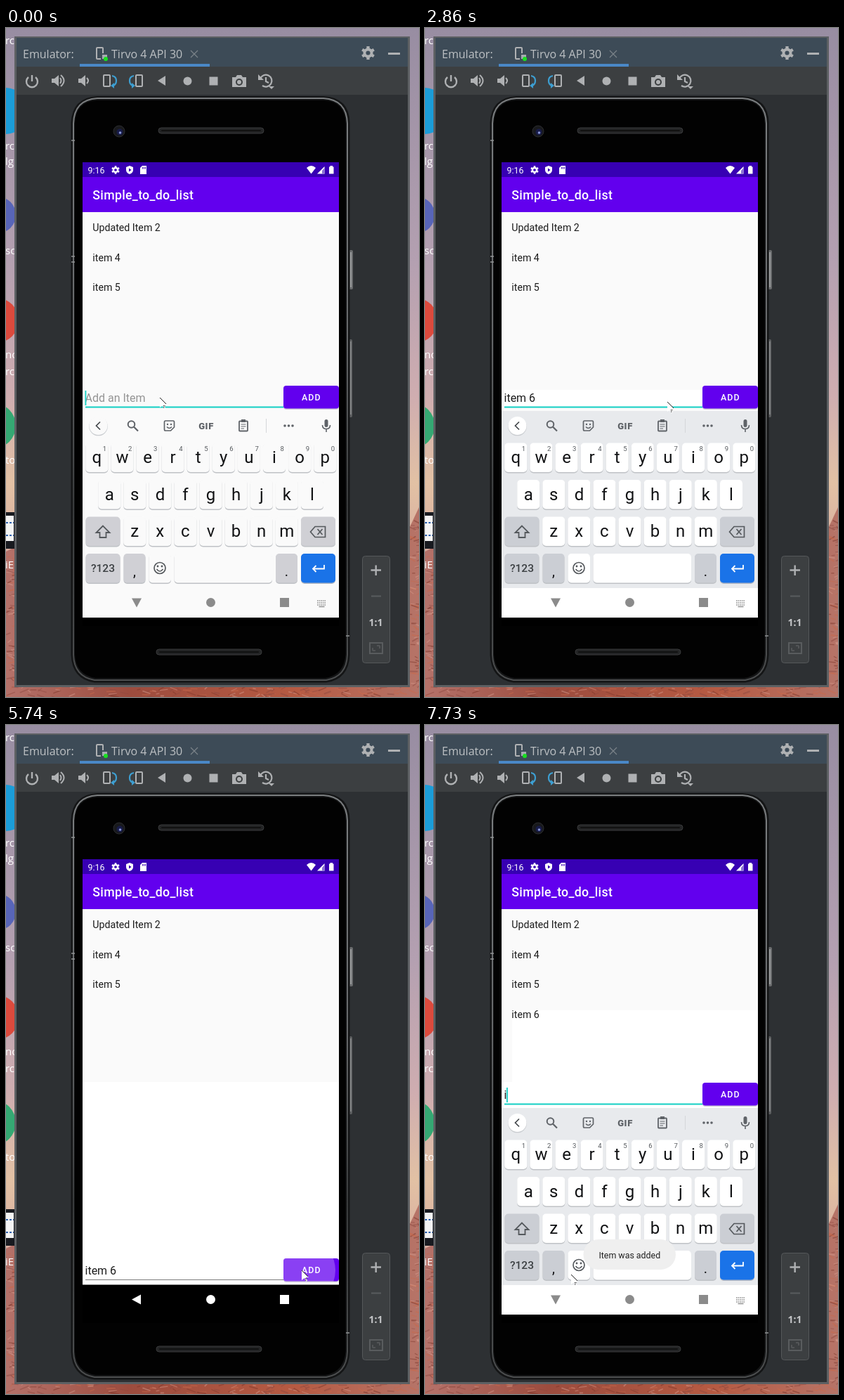
Recreate the animation shown at these times as an HTML page. Size 588 px wide and 952 px high, loop 8000 ms.

```html
<!DOCTYPE html>
<html lang="en">
<head>
<meta charset="utf-8">
<title>To-do list in an emulator</title>
<style>
  html, body { margin: 0; width: 100%; height: 100%; overflow: hidden; background: #2d3033; }
  svg { display: block; width: 588px; height: 952px; }
  text { font-family: Roboto, sans-serif; white-space: pre; }
  .ui { font-family: "Open Sans", "Noto Sans", sans-serif; }
</style>
</head>
<body>
<svg viewBox="0 0 588 952" xmlns="http://www.w3.org/2000/svg">
  <defs>
    <linearGradient id="sky" x2="0" y2="1">
      <stop offset="0" stop-color="#988da2"/>
      <stop offset=".35" stop-color="#b4a0b1"/>
      <stop offset=".55" stop-color="#cfadb0"/>
      <stop offset=".68" stop-color="#e2c1a4"/>
      <stop offset=".78" stop-color="#d9aea0"/>
    </linearGradient>
    <linearGradient id="rock" x2="1">
      <stop offset="0" stop-color="#b5726a"/>
      <stop offset=".3" stop-color="#9c4c3e"/>
      <stop offset=".7" stop-color="#b65a42"/>
      <stop offset="1" stop-color="#b67468"/>
    </linearGradient>
    <linearGradient id="rim" x2="0" y2="1">
      <stop offset="0" stop-color="#7b7e80"/>
      <stop offset=".4" stop-color="#66686a"/>
      <stop offset=".7" stop-color="#393b3c"/>
      <stop offset="1" stop-color="#4c4e4f"/>
    </linearGradient>
    <clipPath id="screen"><path d="M109 191H474V839H109Z"/></clipPath>
    <clipPath id="button"><rect x="395" y="509" width="79" height="33" rx="4"/></clipPath>
  </defs>
  <g id="desktop"></g>
  <g id="frame"></g>
  <g id="phone"></g>
  <g id="live"></g>
</svg>
<script>
const $ = id => document.getElementById(id);
const rect = (x, y, w, h, fill, rx = 0, more = '') =>
  `<rect x="${x}" y="${y}" width="${w}" height="${h}" rx="${rx}" fill="${fill}" ${more}/>`;
const circle = (x, y, r, fill, more = '') => `<circle cx="${x}" cy="${y}" r="${r}" fill="${fill}" ${more}/>`;
const shape = (d, fill, more = '') => `<path d="${d}" fill="${fill}" ${more}/>`;
const line = (d, color, width = 1, more = '') =>
  `<path d="${d}" fill="none" stroke="${color}" stroke-width="${width}" ${more}/>`;
const text = (s, x, y, size, fill, more = '') =>
  `<text x="${x}" y="${y}" font-size="${size}" fill="${fill}" ${more}>${s}</text>`;
const group = (body, x = 0, y = 0, more = '') => `<g transform="translate(${x} ${y})" ${more}>${body}</g>`;
const mid = 'text-anchor="middle"';
const gear = (r, fill, hole) => line(`M0 ${-r}V${r}M${-r * .87} ${-r / 2}L${r * .87} ${r / 2}M${-r * .87} ${r / 2}L${r * .87} ${-r / 2}`,
  fill, r * .45) + circle(0, 0, r * .74, fill) + circle(0, 0, r * .32, hole);

function rockGrain() {
  let seed = 7;
  const random = () => (seed = seed * 16807 % 2147483647) / 2147483647;
  const tones = ['#d59a8c', '#7c3529', '#c9694c', '#8d4a42'];
  const streak = (x, y) => line(`M${x} ${y}l${4 + random() * 9} ${-5 + random() * 10}`, tones[random() * 4 | 0], 1 + random(), 'opacity=".5"');
  let d = '';
  for (let i = 0; i < 130; i++) d += streak(random() * 588, 938 + random() * 14);
  for (let i = 0; i < 70; i++) d += streak(574 + random() * 12, 700 + random() * 240);
  for (let i = 0; i < 50; i++) d += streak(random() * 10, 750 + random() * 190);
  return d;
}

function desktop() {
  const labels = [['rc', 23], ['rc', 173], ['lg', 195], ['sc', 322], ['no', 470], ['rc', 494], ['to', 620], ['iE', 769]];
  return rect(0, 0, 588, 952, 'url(#sky)')
    + shape('M0 745L14 738V952H0ZM0 936H588V952H0ZM574 712L588 682V952H574Z', 'url(#rock)') + rockGrain()
    + circle(-1, 118, 33, '#1b9cd8') + circle(-12, 266, 26, '#5865b8')
    + circle(-14, 416, 32, '#dc4a3d') + circle(-18, 566, 32, '#35a873')
    + rect(0, 689, 13, 52, '#181a20') + rect(0, 694, 11, 36, '#f4f4f4')
    + line('M0 704H11M0 722H11', '#3264b0', 2, 'stroke-dasharray="3 2"')
    + labels.map(([s, y]) => text(s, -1, y, 15, '#fff', 'class="ui"')).join('');
}

function toolbar() {
  const c = '#afb1b3', blue = '#3d9fd2';
  const speaker = 'M-9 -3H-5L1 -8V8L-5 3H-9Z';
  const turn = rect(-9, -8, 9, 16, 'none', 1, `stroke="${c}" stroke-width="2"`)
    + line('M3 -7Q9 -6 9 0Q9 6 4 7', blue, 2.2) + shape('M1 7L6 3V11Z', blue);
  return group(line('M-5 -6A8 8 0 1 0 5 -6M0 -9V0', c, 2.4), 37, 76)
    + group(shape(speaker, c) + line('M3 -4Q6 0 3 4M4 -8Q13 0 4 8', c, 2), 74, 75)
    + group(shape(speaker, c) + line('M3 -4Q7 0 3 4', c, 2), 112, 75)
    + group(turn, 148, 75)
    + `<g transform="translate(185 75) scale(-1 1)">${turn}</g>`
    + shape('M216 75L227 68V82Z', c) + circle(258.5, 75.5, 6, c) + rect(289.5, 69.5, 12, 12, c)
    + group(shape('M-10 -6H-5L-3 -9H3L5 -6H10V8H-10Z', c) + circle(0, 1, 5, '#3c3f41') + circle(0, 1, 3, c), 332, 76)
    + group(line('M-8 -3A8.5 8.5 0 1 1 -5 7M0 -5V1L4 3', c, 2.2) + shape('M-11 -9V-1H-3Z', c) + shape('M4 8H12L8 12Z', c), 370, 75);
}

function frame() {
  const c = '#afb1b3', dim = '#595c5e';
  return rect(12, 12, 563, 926, '#5d6063') + rect(15, 14, 557, 921, '#2d3033')
    + rect(15, 14, 557, 41, '#3d4b57') + rect(15, 55, 557, 40, '#3c3f41')
    + rect(105, 51, 185, 4, '#4a88c7')
    + text('Emulator:', 24, 42.5, 16, '#bdc1c4', 'class="ui"')
    + text('Tirvo 4 API 30', 150, 42.5, 16, '#bdc1c4', 'class="ui"')
    + rect(129, 28, 9, 16, 'none', 1, `stroke="${c}" stroke-width="2"`)
    + rect(135, 36, 9, 9, '#3d4b57') + rect(137, 38, 7, 6, '#a5abb0') + circle(142, 44, 3, '#18e020')
    + line('M263 32L273 42M273 32L263 42', '#7b8389', 1.2)
    + group(gear(9.5, c, '#3d4b57'), 515.5, 35.5) + rect(544, 35, 17, 3, c)
    + toolbar()
    + rect(507.5, 751.5, 39, 152, '#3c3f41', 4, 'stroke="#55585a"')
    + line('M519.500 771.500H534M526.700 764.500V779', c, 2.4) + line('M520 808.500H534', dim, 2)
    + text('1:1', 526.5, 851, 14, '#c5c7c9', `class="ui" font-weight="700" ${mid}`)
    + rect(518, 875, 18, 15, 'none', 0, `stroke="${dim}" stroke-width="2"`)
    + line('M522 886V882M522 886H526M532 879H528M532 879V883', dim, 1.5);
}

function phone() {
  const slot = y => rect(217, y, 150, 8, '#232425', 4, 'stroke="#3a3b3c"') + rect(221, y + 3, 142, 2, '#111', 1);
  return rect(488, 316, 6, 56, '#696b6d', 2) + rect(488, 443, 5, 111, '#5c5e60', 2)
    + rect(490, 319, 2, 50, '#999b9c') + rect(490, 446, 1.5, 104, '#8b8d8e')
    + shape('M130 97H452Q489 99 489.500 135V892Q488 927 456 931.500H126Q94 927 92.500 892V135Q94 99 130 97Z', '#141516')
    + line('M96 892V136Q97 102 130 100H452Q485 102 486 136V892Q485 923 456 928H126Q97 923 96 892Z', 'url(#rim)', 2)
    + shape('M130 103H452Q483 104 483.500 137V890Q482 921 454 925H128Q99 921 98 890V137Q99 104 130 103Z', '#020202')
    + line('M93 160H98M93 325H98M93 333H98M484 865H489', '#909294', 1.4)
    + slot(142) + group(slot(0), -3, 884)
    + circle(161, 147, 8, '#18191c', 'stroke="#2c2d30"') + circle(162, 148, 4.5, '#171b47') + circle(162.5, 149, 1.8, '#8795d8');
}

function appBars() {
  const w = '#fff';
  return rect(109, 191, 365, 21, '#3700b3') + rect(109, 212, 365, 50, '#6200ee')
    + text('9:16', 116.5, 206.5, 12.4, w)
    + group(gear(5.8, w, '#3700b3'), 156, 202)
    + shape('M176 196L181 198V202Q181 206 176 208Q171 206 171 202V198Z', w) + shape('M175 199.5L178.5 202L175 204.5Z', '#3700b3')
    + shape('M194 196H200V208H191V199Z', w) + line('M194.5 198V200.5M196.5 198V200.5M198.5 198V200.5', '#3700b3', 1)
    + shape('M428 199Q434.500 193 441 199L434.500 207.500Z', w)
    + shape('M443 207.500L453.500 197V207.500Z', w) + shape('M450 203L453.500 199V207.500H450Z', '#8d74d5')
    + shape('M461.500 196H465V197.500H466.500V207.500H460V197.500H461.500Z', w)
    + text('Simple_to_do_list', 123.3, 244, 17.74, w, 'font-weight="500" letter-spacing=".3"');
}

function keyStrip({ strip, chip }) {
  const g = '#5f6368', chevron = strip === 'tools' ? 'M134 560.500L128.500 566L134 571.500' : 'M128.500 560.500L134 566L128.500 571.500';
  const mic = rect(453.5, 557, 5, 11, g, 2.5) + line('M450.500 565Q450.500 570.500 456 570.500Q461.500 570.500 461.500 565M456 570.500V575', g, 1.6);
  const tools = circle(178.5, 564, 4.8, 'none', `stroke="${g}" stroke-width="2"`) + line('M182 567.500L188 573.500', g, 2.2)
    + line('M227 559H238Q239.500 559 239.500 561V568L234.500 573H227Q225.500 573 225.500 571V561Q225.500 559 227 559Z', g, 1.7)
    + circle(230, 564, 1.2, g) + circle(235, 564, 1.2, g) + line('M229 567.500Q232.500 571.500 236 567.500', g, 1.5)
    + text('GIF', 285, 570.5, 13, g, `font-weight="900" letter-spacing=".6" ${mid}`)
    + rect(332, 559.5, 12, 14, 'none', 1, `stroke="${g}" stroke-width="1.8"`) + rect(335, 557, 6, 4, g)
    + line('M334.500 564H341.500M334.500 567H341.500M334.500 570H339', g, 1.2)
    + line('M370.500 556V576', '#d5d7da') + [397, 402.5, 408].map(x => circle(x, 566, 1.8, g)).join('');
  const words = [['item', 189.5], ['Item', 290.5], ['items', 391]].map(([s, x]) => text(s, x, 572, 16, '#53575b', mid)).join('')
    + line('M237.500 556V576M344.500 556V576', '#cfd2d6');
  return circle(131.5, 567, 13.3, '#c9ccd0') + circle(131.5, 566, 13, chip)
    + line(chevron, '#44484c', 1.7) + mic + ({ tools, words }[strip] || '');
}

function keyboard(s) {
  const ink = '#111214', g = '#55595d', step = 36.1;
  const key = (x, y, w, fill) => rect(x, y + 1, w, 42, '#bfc2c6', 5) + rect(x, y, w, 41.5, fill, 5);
  const letters = (row, x, y) => [...row].map((c, i) =>
    key(x + i * step - 16, y, 32, s.chip) + text(c, x + i * step, y + 28.5, 24, ink, mid)).join('');
  const digits = [...'1234567890'].map((d, i) => text(d, 140.5 + i * step, 601.5, 9.5, g, mid)).join('');
  return rect(109, 545, 365, 252, s.tone) + rect(109, 797, 365, 42, s.chip)
    + keyStrip(s)
    + letters('qwertyuiop', 129.3, 590.5) + digits + letters('asdfghjkl', 147.2, 643) + letters('zxcvbnm', 183.2, 695.5)
    + key(113.5, 695.5, 49, s.dark) + line('M138 708.500L128.500 718H133.500V725H142.500V718H147.500Z', g, 1.8)
    + key(420, 695.5, 49, s.dark) + line('M433.500 717L440 709.500H454.500V724.500H440ZM443.500 713L450.500 721M450.500 713L443.500 721', g, 1.7)
    + key(113.5, 748, 49, s.dark) + text('?123', 138, 774, 15.5, '#3c4043', `font-weight="500" ${mid}`)
    + key(167.5, 748, 31, s.dark) + text(',', 183, 780, 20, ink, mid)
    + key(203.5, 748, 31.5, s.chip) + circle(219, 768.5, 8, 'none', `stroke="${g}" stroke-width="1.7"`)
    + circle(216, 766, 1.4, g) + circle(222, 766, 1.4, g) + line('M214.500 770Q219 776 223.500 770', g, 1.6)
    + key(239.5, 748, 139.5, s.chip)
    + key(384, 748, 31, s.dark) + text('.', 399.5, 780, 20, ink, mid)
    + rect(420, 749, 49, 42, '#b3b9c4', 5) + rect(420, 748, 49, 41.5, '#1a73e8', 5)
    + line('M453 764V769.500H437.500M441.500 765L437 769.500L441.500 774', '#fff', 1.8);
}

function navIcons({ nav, spin, imeIcon }) {
  const dots = [0, 3, 6].map(y => line(`M443 ${815 + y}H456`, '#8d8d8d', 1.6, 'stroke-dasharray="1.6 1"')).join('');
  return `<g transform="translate(186 817.5) rotate(${spin})">${shape('M-7 -6H7L0 7Z', nav)}</g>`
    + circle(291.5, 817.5, 6.5, nav) + rect(390, 811, 13, 13, nav)
    + (imeIcon ? dots + line('M445.500 823.500H453.500', '#8d8d8d', 1.4) : '');
}

function inputRow(s) {
  const button = rect(395, 510, 79, 33, '#cfcbd8', 4) + rect(395, 509, 79, 32.5, '#6200ee', 4)
    + (s.ripple ? `<g clip-path="url(#button)">${circle(421, 526, s.ripple, '#fff', 'opacity=".25"')}</g>` : '')
    + text('ADD', 421, 530, 12.4, '#fff', 'font-weight="500" letter-spacing="1.1"');
  return group(
    (s.value ? text(s.value, 112.5, 532, 16, '#1c1c1c') : text('Add an Item', 112.5, 532, 16, '#949494'))
    + (s.compose ? line(`M113 534.500H${s.compose}`, '#222', 1.1) : '')
    + (s.focus ? rect(113, 538.5, 283, 2, '#12cfc4') : rect(113, 539, 283, 1, '#7a7a7a'))
    + (s.caret ? rect(s.caret, 516, 1.8, 21, '#12cfc4') : '') + button, 0, s.drop);
}

const pointer = (x, y) => group(shape('M0 0L10 10H6L8 15L6 16L4 11L0 14Z', '#fff')
  + line('M0 0L9 9M5 11L6 12.500M7.500 12L6.500 11M5 14H6.500', '#222', 1), x, y);

const toast = () => rect(225.5, 732, 131.5, 43, '#efefef', 21.5)
  + text('Item was added', 291.3, 758.5, 12.4, '#222', mid);

function scene(s) {
  const items = ['Updated Item 2', 'item 4', 'item 5', ...(s.added ? ['item 6'] : [])];
  return rect(109, 262, 365, 535, '#fafafa') + rect(109, 508, 365, 288.5, s.backdrop)
    + (s.added ? rect(124, 406, 350, 102, '#fff') : '')
    + rect(113, 515, 283, 25, s.chip)
    + appBars()
    + items.map((item, i) => text(item, 123.3, 289 + i * 42.5, 14.2, '#1b1b1b')).join('')
    + inputRow(s) + rect(109, 796.5, 365, 54.5, '#000')
    + (s.kb ? `<g clip-path="url(#screen)" opacity="${s.kb}">${group(keyboard(s), 0, s.shift)}</g>` : '')
    + navIcons(s)
    + (s.toast ? toast() : '')
    + pointer(...s.at);
}

const grey = { tone: '#e8eaed', chip: '#fff', dark: '#cbced4' };
const open = { ...grey, kb: 1, shift: 0, spin: 0, nav: '#8b8b8b', imeIcon: true, strip: 'tools' };
const closed = { kb: 0, spin: 90, nav: '#fff', imeIcon: false };

// Each step changes part of the state at its time in ms.
const steps = [
  [0, { ...open, tone: '#fafafa', chip: '#fafafa', dark: '#d0d0d5', backdrop: '#fafafa', value: '', compose: 0,
    focus: true, caret: 112.5, ripple: 0, drop: 0, added: false, toast: false, at: [219, 526] }],
  [560, { ...grey, caret: 0 }],
  [840, { value: 'i', compose: 117, caret: 116 }],
  [1260, { value: 'it', compose: 122, caret: 121, strip: 'words' }],
  [1540, { value: 'ite', compose: 130, caret: 130 }],
  [1680, { value: 'item', compose: 144, caret: 144 }],
  [1820, { value: 'item ', caret: 147.5 }],
  [2120, { value: 'item 6', compose: 157, caret: 157 }],
  [2260, { compose: 0, strip: 'tools' }],
  [2710, { caret: 0, at: [262, 529] }],
  [2860, { at: [345, 532] }],
  [3010, { at: [415, 534] }],
  [3170, { caret: 157, at: [440, 534] }],
  [3600, { caret: 0, at: [325, 655] }],
  [3750, { caret: 157, at: [203, 788] }],
  [4030, { caret: 0 }],
  [4180, { at: [204, 800] }],
  [4320, { caret: 157, at: [207, 815] }],
  [4460, { at: [209, 822] }],
  [4740, { caret: 0, kb: .7, shift: 35, spin: 12, strip: '', drop: 250, backdrop: '#fff', imeIcon: false }],
  [4890, { kb: .2, shift: 124, spin: 35, nav: '#f2f2f2', tone: '#fff' }],
  [5030, { ...closed }],
  [5170, { focus: false }],
  [5310, { at: [248, 812] }],
  [5450, { at: [322, 795] }],
  [5600, { at: [396, 780] }],
  [5740, { ripple: 48, at: [421, 776] }],
  [5870, { ripple: 90, value: '', added: true }],
  [6010, { ripple: 0, toast: true }],
  [6290, { at: [385, 778] }],
  [6440, { at: [318, 780] }],
  [6580, { at: [250, 782] }],
  [6720, { at: [214, 782] }],
  [6870, { at: [208, 782] }],
  [7020, { focus: true, caret: 112.5 }],
  [7160, { drop: 0, nav: '#b5b5b5', imeIcon: true }],
  [7450, { ...open, kb: .8, shift: 20, spin: 30 }],
  [7590, { ...open }],
  [7730, { value: 'i', caret: 116 }],
];
const LOOP = 8000;

$('desktop').innerHTML = desktop();
$('frame').innerHTML = frame();
$('phone').innerHTML = phone();

let shown = 0;
function tick(now) {
  const t = now % LOOP;
  const count = steps.filter(([at]) => at <= t).length;
  if (count !== shown) {
    shown = count;
    $('live').innerHTML = scene(Object.assign({}, ...steps.slice(0, count).map(step => step[1])));
  }
  requestAnimationFrame(tick);
}
tick(performance.now());
</script>
</body>
</html>
```
